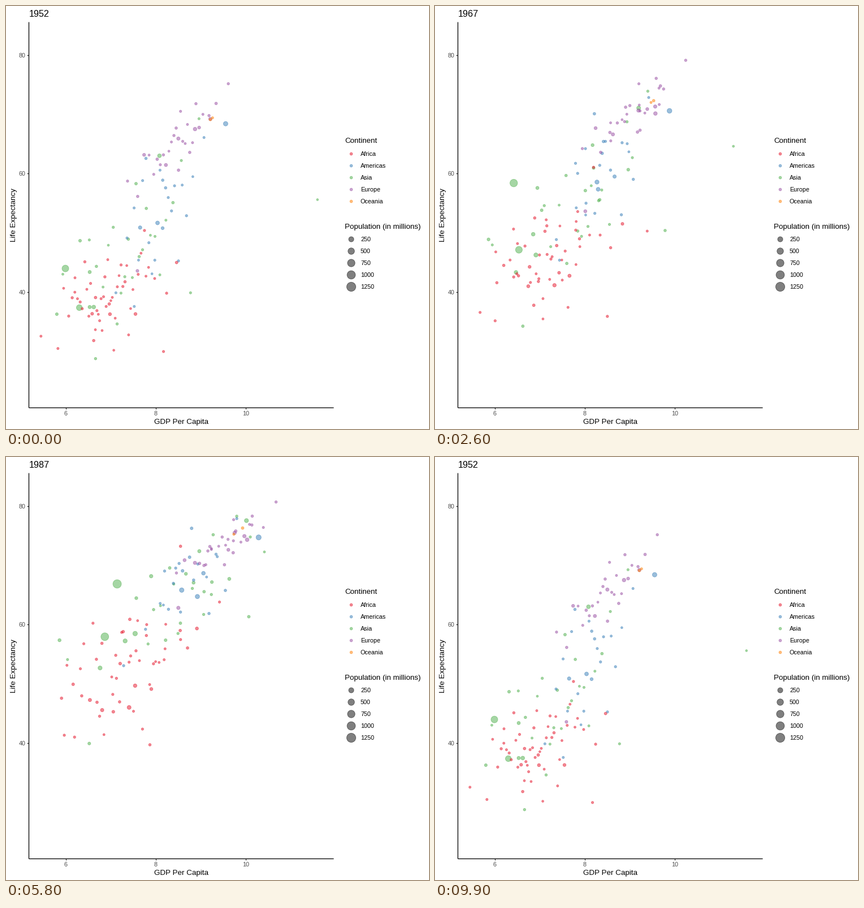
A matplotlib script that plays this animation: 748 px wide and 748 px high, repeating every 10 s.

```python
import numpy as np
import matplotlib.pyplot as plt
from matplotlib.animation import FuncAnimation

SIDE, DPI = 748, 100
PX = 72 / DPI                       # points per pixel
YEARS = np.arange(52, 108, 5)
T = np.linspace(0, 1, len(YEARS))
KNOTS = [52, 62, 72, 82, 92, 107]
RED, BLUE, GREEN, PURPLE, ORANGE = "#E6142A", "#377EB8", "#4DAF4A", "#984EA3", "#FF7F00"
rng = np.random.default_rng(11)
layers = []                         # (color, positions by year, populations by year)

plt.rcParams["font.family"] = "Liberation Sans"


def to_px(x, y):
    return np.stack([265 + 79.6 * (x - 8), 296.3 - 10.49 * (y - 60)], axis=-1)


def drift(n):
    """Evenly spread normal scores that slowly blend into other ones."""
    scores = np.quantile(rng.normal(size=4000), (np.arange(n) + 0.5) / n)
    a, b = rng.permutation(scores), rng.permutation(scores)
    turn = 0.8 * T[:, None]
    return np.cos(turn) * a + np.sin(turn) * b


def ramp(pair):
    return (pair[0] + T * (pair[1] - pair[0]))[:, None]


def swarm(color, n, mean_x, mean_y, spread_x, slope, spread_y, pop):
    """Cloud around a moving mean, tilted along a trend line."""
    dx = ramp(spread_x) * drift(n)
    x = np.interp(YEARS, KNOTS, mean_x)[:, None] + dx
    y = (np.interp(YEARS, KNOTS, mean_y)[:, None]
         + ramp(slope) * dx + ramp(spread_y) * drift(n))
    size = ramp(pop) * np.exp(rng.normal(0, 0.9, n))
    layers.append((color, to_px(x, y), size))


def track(color, pop, *pts):
    """One point led through (year, x, y) stops."""
    year, x, y = np.transpose(pts)
    xy = to_px(np.interp(YEARS, year, x), np.interp(YEARS, year, y))
    layers.append((color, xy[:, None], ramp(pop)))


def radius(size):
    return 0.4575 * (2.845 * size + 0.945)


def pop_radius(pop):
    return radius(1 + 5 * np.sqrt(np.asarray(pop) / 1319))


# large or far-out points
track(GREEN, (556, 1319), (52, 5.99, 44), (57, 6.36, 50.5), (62, 6.19, 44.5),
      (67, 6.42, 58.4), (72, 6.52, 63.1), (82, 6.87, 65.5), (87, 7.23, 67.3),
      (92, 7.41, 68.7), (107, 8.51, 73))
track(GREEN, (372, 1110), (52, 6.3, 37.4), (62, 6.49, 43.6), (72, 6.58, 50.7),
      (82, 6.75, 56.6), (92, 7.06, 60.2), (107, 7.8, 64.7))
track(GREEN, (82, 223), (52, 6.62, 37.5), (72, 7.01, 49.2), (92, 7.78, 62.7),
      (107, 8.17, 70.6))
track(GREEN, (86, 127), (52, 8.08, 63), (62, 8.79, 68.7), (72, 9.6, 73.4),
      (92, 10.2, 79.4), (107, 10.36, 82.6))
track(GREEN, (41, 169), (52, 6.53, 43.4), (72, 6.96, 51.9), (107, 7.87, 65.5))
track(GREEN, (47, 150), (52, 6.53, 37.5), (72, 6.45, 45.3), (107, 7.24, 64.1))
track(GREEN, (0.2, 2.5), (52, 11.59, 55.6), (62, 11.47, 60.5), (67, 11.3, 64.6),
      (72, 11.6, 67.7), (82, 10.35, 71.3), (107, 10.76, 77.6))
track(GREEN, (8, 32), (52, 6.66, 28.8), (72, 6.61, 36.1), (92, 6.48, 41.7),
      (107, 6.88, 43.8))
track(GREEN, (20, 48), (52, 5.8, 36.3), (72, 5.88, 53.1), (92, 5.85, 59.3),
      (107, 6.85, 62.1))
track(GREEN, (4, 27), (52, 8.77, 39.9), (72, 10.12, 53.9), (107, 9.98, 72.8))
swarm(GREEN, 23, [7.45, 7.75, 8.15, 8.5, 8.75, 9.05],
      [48.5, 53.5, 59, 64, 68, 72], (0.75, 1.05), (5.5, 5), (6, 3.3), (5, 20))

track(BLUE, (158, 301), (52, 9.55, 68.4), (72, 9.99, 71.3), (87, 10.31, 75),
      (107, 10.67, 78.2))
track(BLUE, (57, 190), (52, 7.65, 50.9), (72, 8.51, 59.5), (87, 8.96, 65.2),
      (107, 9.11, 72.4))
track(BLUE, (30, 109), (52, 8.15, 50.8), (72, 8.83, 62.4), (92, 9.16, 71.5),
      (107, 9.39, 76.2))
track(BLUE, (3, 8), (52, 7.52, 37.6), (72, 7.41, 48), (107, 7.09, 60.9))
swarm(BLUE, 21, [8.1, 8.25, 8.5, 8.72, 8.75, 9.05],
      [53.6, 58.7, 62.7, 66.5, 70, 74], (0.5, 0.58), (9, 3.5), (6, 2.2), (4, 10))

track(PURPLE, (22, 71), (52, 7.59, 43.6), (72, 8.15, 57), (107, 9.04, 71.8))
track(PURPLE, (69, 82), (52, 8.87, 67.5), (72, 9.8, 71), (107, 10.38, 79.4))
track(PURPLE, (50, 61), (52, 9.21, 69.2), (72, 9.68, 72), (107, 10.41, 79.4))
track(PURPLE, (48, 58), (52, 8.5, 65.9), (72, 9.42, 72.2), (107, 10.26, 80.5))
swarm(PURPLE, 26, [8.47, 8.87, 9.25, 9.5, 9.55, 9.93],
      [65.3, 69.2, 71.2, 73, 74.5, 77.7], (0.55, 0.58), (7, 4), (2.3, 0.9), (6, 8))

track(RED, (33, 135), (52, 6.98, 36.3), (72, 7.44, 42.8), (92, 7.39, 47.5),
      (107, 7.61, 46.9))
track(RED, (2, 9), (52, 6.2, 40), (82, 6.78, 46.2), (87, 6.74, 44),
      (92, 6.6, 23.6), (97, 6.38, 36.1), (107, 6.76, 46.2))
track(RED, (14, 65), (52, 6.66, 39.1), (72, 6.81, 46), (87, 6.51, 47.4),
      (102, 5.48, 45), (107, 5.63, 46.5))
track(RED, (4, 12), (52, 8.17, 30), (72, 8.61, 37.9), (87, 7.8, 39.9),
      (107, 8.48, 42.7))
track(RED, (1, 6), (52, 7.78, 42.7), (62, 8.82, 47.8), (72, 9.95, 52.8),
      (92, 9.17, 68.8), (107, 9.4, 74))
track(RED, (14, 44), (52, 8.46, 45), (72, 8.96, 53.7), (92, 8.89, 61.9),
      (107, 9.13, 49.3))
swarm(RED, 46, [6.9, 7.05, 7.25, 7.32, 7.3, 7.5],
      [39, 43.3, 47.8, 52, 54.2, 55.5], (0.6, 0.88), (2.5, 5.5), (4, 6.5), (3, 9))

track(ORANGE, (9, 20), (52, 9.21, 69.1), (92, 10.06, 77.6), (107, 10.45, 81.2))
track(ORANGE, (2, 4), (52, 9.26, 69.4), (92, 9.82, 76.3), (107, 10.13, 80.2))

pos = np.concatenate([p for _, p, _ in layers], axis=1)
rad = pop_radius(np.concatenate([s for _, _, s in layers], axis=1))
colors = [c for c, p, _ in layers for _ in range(p.shape[1])]

fig = plt.figure(figsize=(SIDE / DPI, SIDE / DPI), dpi=DPI, facecolor="white")
ax = fig.add_axes([0, 0, 1, 1])
ax.set(xlim=(0, SIDE), ylim=(SIDE, 0))
ax.axis("off")


def text(x, y, s, px=13.4, color="black", **kw):
    kw.setdefault("va", "baseline")
    return ax.text(x, y, s, fontsize=px * PX, color=color, **kw)


def line(xs, ys, color="black"):
    ax.plot(xs, ys, color=color, lw=1.3 * PX, solid_capstyle="butt")


def area(r):
    return (2 * PX * np.asarray(r)) ** 2


def dots(xy, r, color):
    xy = np.asarray(xy)
    return ax.scatter(xy[:, 0], xy[:, 1], s=area(r), c=color, alpha=0.5,
                      linewidths=0.86 * PX)


# axes
for v in (6, 8, 10):
    x = to_px(v, 60)[0]
    line([x, x], [709.5, 713.2], "#333333")
    text(x, 723.6, str(v), 10.7, "#4D4D4D", ha="center")
for v in (40, 60, 80):
    y = to_px(8, v)[1]
    line([36.9, 40.5], [y, y], "#333333")
    text(34.3, y + 4.1, str(v), 10.7, "#4D4D4D", ha="right")
line([40.5, 40.5], [28, 710.1])
line([39.9, 579], [709.5, 709.5])
text(309.7, 738.7, "GDP Per Capita", ha="center")
text(17, 369, "Life Expectancy", rotation=90, ha="center", va="baseline",
     rotation_mode="anchor")

# legends
text(599, 242.2, "Continent")
keys = [("Africa", RED), ("Americas", BLUE), ("Asia", GREEN),
        ("Europe", PURPLE), ("Oceania", ORANGE)]
text(599, 393.5, "Population (in millions)")
for i, (name, color) in enumerate(keys):
    pop = 250 * (i + 1)
    for top, r, c, label in ((260.6, radius(1.5), color, name),
                             (412, pop_radius(pop), "black", str(pop))):
        y = top + 21.1 * i
        dots([(609.9, y)], r, c)
        text(627, y + 4, label, 10.7)

title = text(40.7, 18.5, "1952", 16.1)
cloud = dots(pos[0], rad[0], colors)

# first moving step of each change
MOVES = [5, 14, 23, 32, 41, 49, 56, 64, 72, 80, 88, 96]


def draw(i):
    k, f = 0, 0
    for j, m in enumerate(MOVES):
        steps = 3 if j == 5 else 4
        if i >= m + steps - 1:
            k = j + 1
        elif i >= m:
            f = (i - m + 1) / steps
    a, b = k % 12, (k + 1) % 12
    cloud.set_offsets(pos[a] + f * (pos[b] - pos[a]))
    cloud.set_sizes(area(rad[a] + f * (rad[b] - rad[a])))
    title.set_text(str(1952 + 5 * (b if f > 0.5 else a)))
    return cloud, title


anim = FuncAnimation(fig, draw, frames=100, interval=100, repeat=True,
                     repeat_delay=0, blit=False)
plt.show()
```
